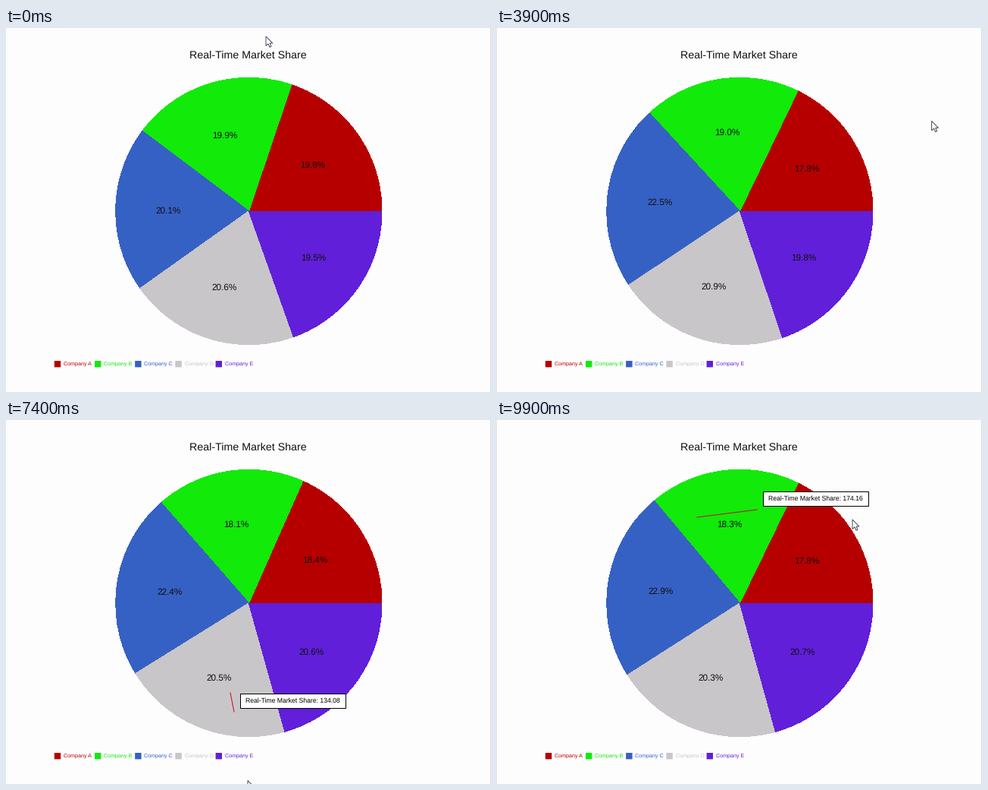
Write a matplotlib script that moves like this. It is 640 px wide and 479 px high and loops after 10000 ms.

```python
import numpy as np
import matplotlib.pyplot as plt
from matplotlib.animation import FuncAnimation
from matplotlib.patches import Polygon, Rectangle, Wedge

W, H, DPI = 640, 479, 64
PX = 72 / DPI  # points per pixel
FRAMES, STEP = 100, 100

plt.rcParams.update({"font.family": "Liberation Sans", "text.hinting": "none"})

TITLE = "Real-Time Market Share"
COLORS = ["#b60000", "#12ea0a", "#3661c4", "#c9c6c9", "#611fd9"]
VALUES = [129.46, 174.16, 185.04, 134.08, 141.72]
CENTER = np.array([320.4, 241])
LABEL_CENTER = np.array([319.5, 240.9])
RADIUS, LABEL_R, HOVER_R = 175.6, 105, 202
LAG = 2  # the tooltip trails the pointer by this many steps

# key points of the pointer: seconds, x, y
KEYS = np.array([
    [0, 343, 11], [0.2, 342, -25], [3.4, 342, -25],
    [3.5, 562, 112], [4.5, 591, 138], [5, 449, 169], [5.1, 472, 111],
    [5.3, 591, 138], [6.2, 632, 440], [6.5, 540, 400],
    [7.1, 296, 359], [7.2, 301, 384], [7.4, 319, 474.5],
    [8.2, 200, 490], [8.7, 162, 259], [8.8, 150, 221], [8.9, 116, 225],
    [9.1, 203, 257], [9.6, 264, 128], [9.7, 343, 118], [9.9, 469, 131],
])
ARROW = np.array([[0, 0], [0, 12.5], [3, 9.8], [5, 14.3], [7, 13.4],
                  [5.1, 9], [8.8, 9]])


def pointer(n):
    t = n * STEP / 1000
    return np.array([np.interp(t, KEYS[:, 0], c) for c in KEYS[:, 1:].T])


def wave(t, peak, period):
    return np.cos(2 * np.pi * (t - peak) / period)


def shares(t):
    """Slow drifts with a small wobble; company D takes the rest."""
    a = 18.1 + 1.45 * np.exp(-t) - 0.3 * wave(t, 3.7, 6.3)
    b = 19 + 0.95 * wave(t, 0, 16)
    c = 22.8 - 2.6 * np.exp(-t / 2.6) + 0.25 * wave(t, 4.2, 6.4)
    e = 20.1 - 0.65 * wave(t, 1.3, 15)
    return np.array([a, b, c, 100 - a - b - c - e, e])


def last_hover(n):
    """Latest step at which the pointer was over the pie, or None."""
    for k in range(n - LAG, 0, -1):
        if np.hypot(*(pointer(k) - CENTER)) < HOVER_R:
            return k
    return None


fig = plt.figure(figsize=(W / DPI, H / DPI), dpi=DPI, facecolor="#fefdfe")
ax = fig.add_axes([0, 0, 1, 1])
ax.set(xlim=(0, W), ylim=(H, 0))
ax.axis("off")


def write(x, y, s, size, color="#101010", ha="center", z=3):
    return ax.text(x, y, s, size=size * PX, color=color, ha=ha,
                   va="baseline", zorder=z)


write(319.8, 39.4, TITLE, 14.2)
ax.add_patch(Rectangle((639, 0), 1, H, fc="#d8d8d8", lw=0))
for i, color in enumerate(COLORS):
    x = 63.8 + 53.2 * i
    ax.add_patch(Rectangle((x, 438), 8.4, 8.4, fc=color, lw=0, snap=False))
    write(x + 12.2, 444.8, f"Company {'ABCDE'[i]}", 7.1, color, "left")

wedges = [ax.add_patch(Wedge(CENTER, RADIUS, 0, 1, fc=c, lw=0, antialiased=False))
          for c in COLORS]
labels = [write(0, 0, "", 11.7) for _ in COLORS]
trail, = ax.plot([], [], color="#c80a1e", lw=PX, zorder=4)
box = ax.add_patch(Rectangle((0, 0), 139, 19, fc="white", ec="black",
                             lw=PX, zorder=5))
tip_text = write(0, 0, "", 8.6, "black", z=6)
arrow = ax.add_patch(Polygon(ARROW, fc="white", ec="#38384a", lw=0.9 * PX,
                             zorder=7))


def draw_pie(parts):
    ends = np.cumsum(parts) * 3.6
    starts = np.r_[0, ends[:-1]]
    for wedge, label, part, a, b in zip(wedges, labels, parts, starts, ends):
        wedge.set_theta1(-b)
        wedge.set_theta2(-a)
        mid = np.radians((a + b) / 2)
        x, y = LABEL_CENTER + LABEL_R * np.array([np.cos(mid), -np.sin(mid)])
        label.set_position((x, y + 4.1))
        label.set_text(f"{part:.1f}%")
    return ends


def draw_tooltip(n, ends):
    k = last_hover(n)
    for item in (trail, box, tip_text):
        item.set_visible(k is not None)
    if k is None:
        return
    tail, tip = pointer(k - 1), pointer(k)
    dx, dy = tip - CENTER
    angle = np.degrees(np.arctan2(-dy, dx)) % 360
    i = min(np.searchsorted(ends, angle), 4)
    x, y = np.round(tip) + [7.5, -24.5]
    trail.set_data([tail[0], tip[0]], [tail[1], tip[1]])
    box.set_xy((x, y))
    tip_text.set_position((x + 69.7, y + 12.2))
    tip_text.set_text(f"{TITLE}: {VALUES[i]:.2f}")


def update(n):
    draw_tooltip(n, draw_pie(shares(n * STEP / 1000)))
    arrow.set_xy(ARROW + pointer(n))
    return []


anim = FuncAnimation(fig, update, frames=FRAMES, interval=STEP,
                     repeat=True, repeat_delay=0, blit=False)
plt.show()
```
